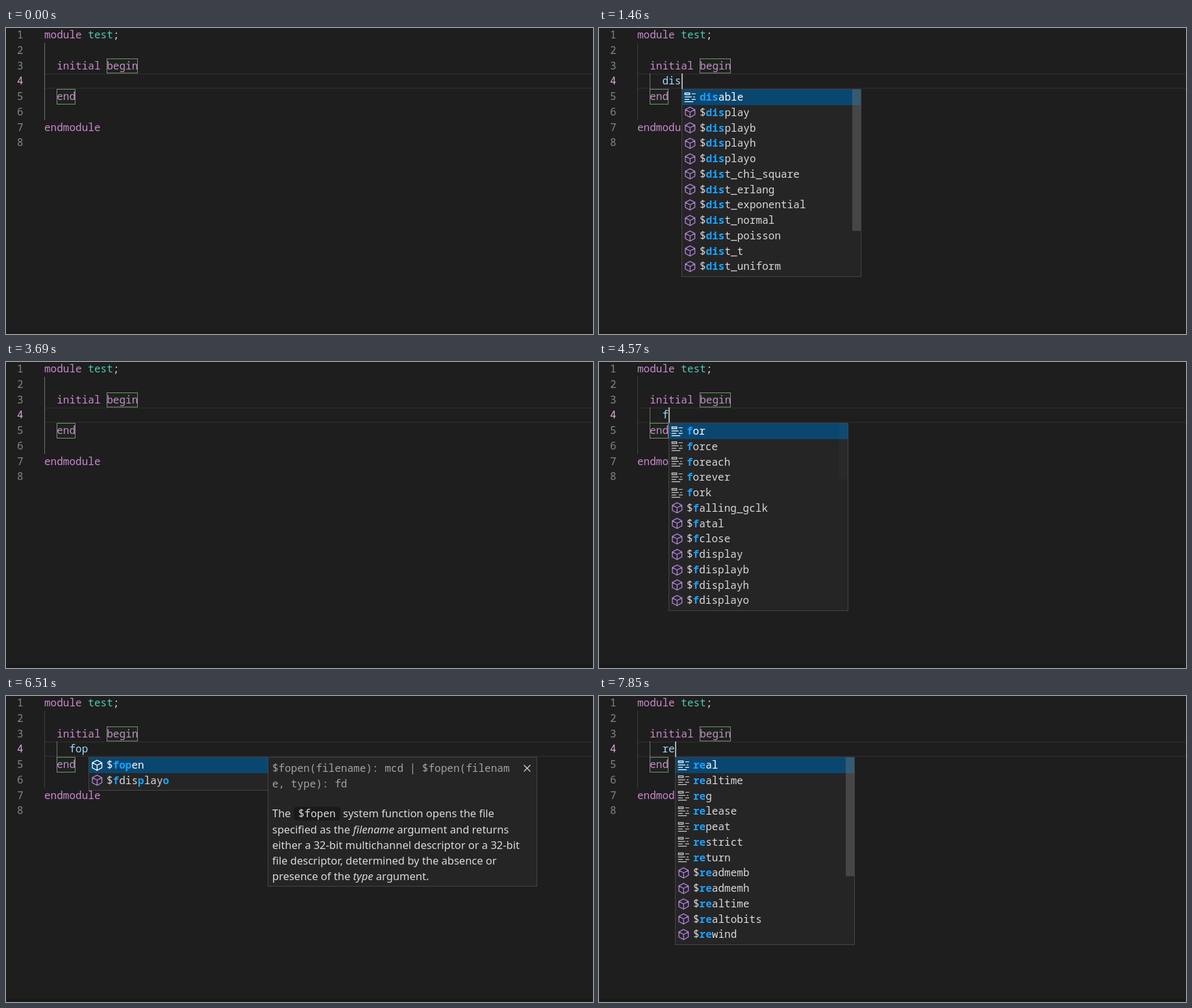
These frames come from a looping animation (904 px wide and 472 px high, 8 s). An HTML page with a canvas:

```html
<!DOCTYPE html>
<html lang="en">
<head>
<meta charset="utf-8">
<title>Code completion</title>
<style>
html, body { margin: 0; width: 100%; height: 100%; overflow: hidden; background: #1e1e1e; }
canvas { display: block; }
</style>
</head>
<body>
<canvas id="stage" width="904" height="472"></canvas>
<script>
const ctx = document.getElementById('stage').getContext('2d');
const MONO = '16.04px "Noto Sans Mono", monospace';
const SANS = '16.5px "Noto Sans", sans-serif';
const CHAR = 9.62, LEFT = 59, ROW = 23.77, LOOP = 8000;
const PINK = '#c988cd', GREY = '#d8d8d8', BODY = '#dadada';

// [start, typed text, caret visible, scrollbar still fading in]
const STEPS = [
  [0, '', 0], [200, '', 1], [730, '', 0],
  [1130, 'd', 1, 1], [1200, 'd', 1], [1260, 'di', 1], [1460, 'dis', 1],
  [1660, 'disp', 1], [2130, 'disp', 0], [2610, 'disp', 1], [3100, 'disp', 0],
  [3240, '', 1], [3690, '', 0], [4240, '', 1],
  [4570, 'f', 1, 1], [4640, 'f', 1], [4910, 'fo', 1],
  [4980, 'fop', 1], [5510, 'fop', 0], [5980, 'fop', 1], [6510, 'fop', 0],
  [6660, '', 1], [7120, '', 0],
  [7650, 'r', 1, 1], [7720, 'r', 1], [7850, 're', 1]
];

const words = s => s.split(' ');
const DISPLAY = '$display $displayb $displayh $displayo';
const DIST = '$dist_chi_square $dist_erlang $dist_exponential';
const FOR = 'for force foreach forever fork';
const READ = '$readmemb $readmemh $realtime $realtobits';
const REAL = 'real realtime reg release repeat restrict return';

// items shown, and how many the whole list holds
const LISTS = {
  d: [words(`deassign disable do $deposit $dimensions ${DISPLAY} ${DIST}`), 36],
  di: [words(`disable $dimensions ${DISPLAY} ${DIST} $dist_normal $dist_poisson $dist_t`), 20],
  dis: [words(`disable ${DISPLAY} ${DIST} $dist_normal $dist_poisson $dist_t $dist_uniform`), 15.85],
  disp: [words(`${DISPLAY} $dist_poisson $dist_exponential`), 6],
  f: [words(`${FOR} $falling_gclk $fatal $fclose $fdisplay $fdisplayb $fdisplayh $fdisplayo`), 40],
  fo: [words(`${FOR} $fopen $fdisplayo $fmonitoro $fstrobeo $fwriteo $ferror`), 11],
  fop: [words('$fopen $fdisplayo'), 2],
  r: [words(`${REAL} $random ${READ}`), 30],
  re: [words(`${REAL} ${READ} $rewind`), 18.9]
};

// `code` and *italic* spans inside the body text
const DOCS = {
  disp: {
    head: ['$display(list_of_arguments)'],
    body: ['The `$display` system task displays its arguments',
      'in the same order as they appear in the argument',
      'list. It automatically adds a newline character to the',
      'end of its output.'],
    height: 154
  },
  fop: {
    head: ['$fopen(filename): mcd | $fopen(filenam', 'e, type): fd'],
    body: ['The `$fopen` system function opens the file',
      'specified as the *filename* argument and returns',
      'either a 32-bit multichannel descriptor or a 32-bit',
      'file descriptor, determined by the absence or',
      'presence of the *type* argument.'],
    height: 200
  }
};

function rect(x, y, w, h, color) {
  ctx.fillStyle = color;
  ctx.fillRect(x, y, w, h);
}

// Baselines sit on whole pixels to keep the text crisp.
function text(str, x, y, color, font = MONO) {
  ctx.font = font;
  ctx.fillStyle = color;
  ctx.fillText(str, x, Math.round(y));
}

function frame(x, y, w, h, border, fill) {
  rect(x, y, w, h, fill);
  ctx.strokeStyle = border;
  ctx.lineWidth = 1;
  ctx.strokeRect(x + .5, y + .5, w - 1, h - 1);
}

const baseline = line => 16 + (line - 1) * ROW;
const code = (line, col, str, color) => text(str, LEFT + col * CHAR, baseline(line), color);

function editor(typed, caret, caretX) {
  rect(0, 0, 904, 472, '#1e1e1e');
  rect(0, 467, 904, 5, '#1a1a1a');
  rect(60, 70, 844, 2, '#282828');
  rect(60, 92, 844, 2, '#282828');
  rect(59, 23, 1, 119, typed ? '#404040' : '#707070');
  if (typed) rect(78, 70, 1, 24, '#707070');
  frame(155, 47, 48, 23, '#888', '#1b251b');
  frame(78, 94, 29, 24, '#888', '#1b251b');
  for (let n = 1; n <= 8; n++) text(n, 17, baseline(n), n === 4 ? '#e2a6dd' : '#858585');
  code(1, 0, 'module', PINK);
  code(1, 7, 'test', '#4ec9b0');
  code(1, 11, ';', GREY);
  code(3, 2, 'initial', PINK);
  code(3, 10, 'begin', PINK);
  code(4, 4, typed, '#9cdcfe');
  code(5, 2, 'end', PINK);
  code(7, 0, 'endmodule', PINK);
  if (caret) rect(caretX, 70, 2, 24, '#aeafad');
}

function icon(isTask, cx, cy, color) {
  ctx.save();
  ctx.translate(cx, cy);
  ctx.scale(1.22, 1.22);
  ctx.translate(-8, -8);
  ctx.strokeStyle = ctx.fillStyle = color;
  ctx.lineWidth = 1.1;
  if (isTask) {
    ctx.stroke(new Path2D('M8 1.5 14 4.6V11L8 14.4 2 11.2V4.6ZM2 4.6 8 7.8 14 4.6M8 7.8V14.4'));
  } else {
    ctx.fill(new Path2D('M10 3h5v1h-5zM1 7h9v1h-9zM12 7h2v1h-2zM1 10h6v1h-6zM10 10h5v1h-5zM1 13h11v1h-11z'));
    ctx.strokeRect(1.5, 2.5, 6, 2);
  }
  ctx.restore();
}

function matches(label, typed) {
  const hits = new Set();
  let pos = 0;
  for (const c of typed) {
    let i = label.indexOf(c, pos);
    if (i < 0) i = label.indexOf(c);
    hits.add(i);
    pos = i + 1;
  }
  return hits;
}

function popup(x, typed, faint) {
  const [items, total] = LISTS[typed];
  const h = Math.round(items.length * ROW + 4.6);
  frame(x, 94, 277, h, '#454545', '#252526');
  rect(x + 1, 95, 275, 24, '#094771');
  items.forEach((label, i) => {
    const isTask = label[0] === '$', selected = i === 0;
    const y = 95 + i * ROW;
    icon(isTask, x + 13.3, Math.round(y + 11.6), selected ? '#fff' : isTask ? '#b180d7' : '#ccc');
    const hits = matches(label, typed);
    [...label].forEach((c, k) => {
      const hit = hits.has(k);
      const color = hit ? '#18a3ff' : selected ? '#fff' : GREY;
      text(c, x + 28 + k * CHAR, y + 17, color, (hit ? 'bold ' : '') + MONO);
    });
  });
  if (total > 12) {
    rect(x + 263, 95, 13, Math.round(288 * 12 / total), `rgba(121,121,121,${faint ? .07 : .4})`);
  }
}

function bodyLine(line, x, y) {
  for (const part of line.split(/(`.*?`|\*.*?\*)/)) {
    const mark = part[0], str = part.slice(1, -1);
    if (mark === '`') {
      const w = str.length * CHAR + 14;
      ctx.fillStyle = '#1a1a1a';
      ctx.beginPath();
      ctx.roundRect(x, Math.round(y) - 16, w, 21, 4);
      ctx.fill();
      text(str, x + 7, y, BODY);
      x += w;
    } else {
      const italic = mark === '*';
      const run = italic ? str : part;
      text(run, x, y, BODY, (italic ? 'italic ' : '') + SANS);
      x += ctx.measureText(run).width;
    }
  }
}

function docs(x, { head, body, height }) {
  frame(x, 94, 415, height, '#454545', '#252526');
  head.forEach((line, i) => text(line, x + 7, 117 + i * 24, '#a2a2a2'));
  const top = 139.3 + head.length * 24;
  body.forEach((line, i) => bodyLine(line, x + 7, top + i * 24.25));
  ctx.strokeStyle = '#ddd';
  ctx.lineWidth = 1.1;
  ctx.stroke(new Path2D(`M${x + 394.5} 106.5l10 10m0 -10l-10 10`));
}

function draw(now) {
  const t = now % LOOP;
  const [, typed, caret, faint] = STEPS.findLast(step => step[0] <= t);
  const x = Math.round(97.7 + typed.length * 9.75);
  editor(typed, caret, x);
  if (typed) popup(x, typed, faint);
  if (DOCS[typed]) docs(x + 276, DOCS[typed]);
}

let start;
function tick(now) {
  start ??= now;
  draw(Math.max(0, now - start));
  requestAnimationFrame(tick);
}
draw(0);
requestAnimationFrame(tick);
</script>
</body>
</html>
```
